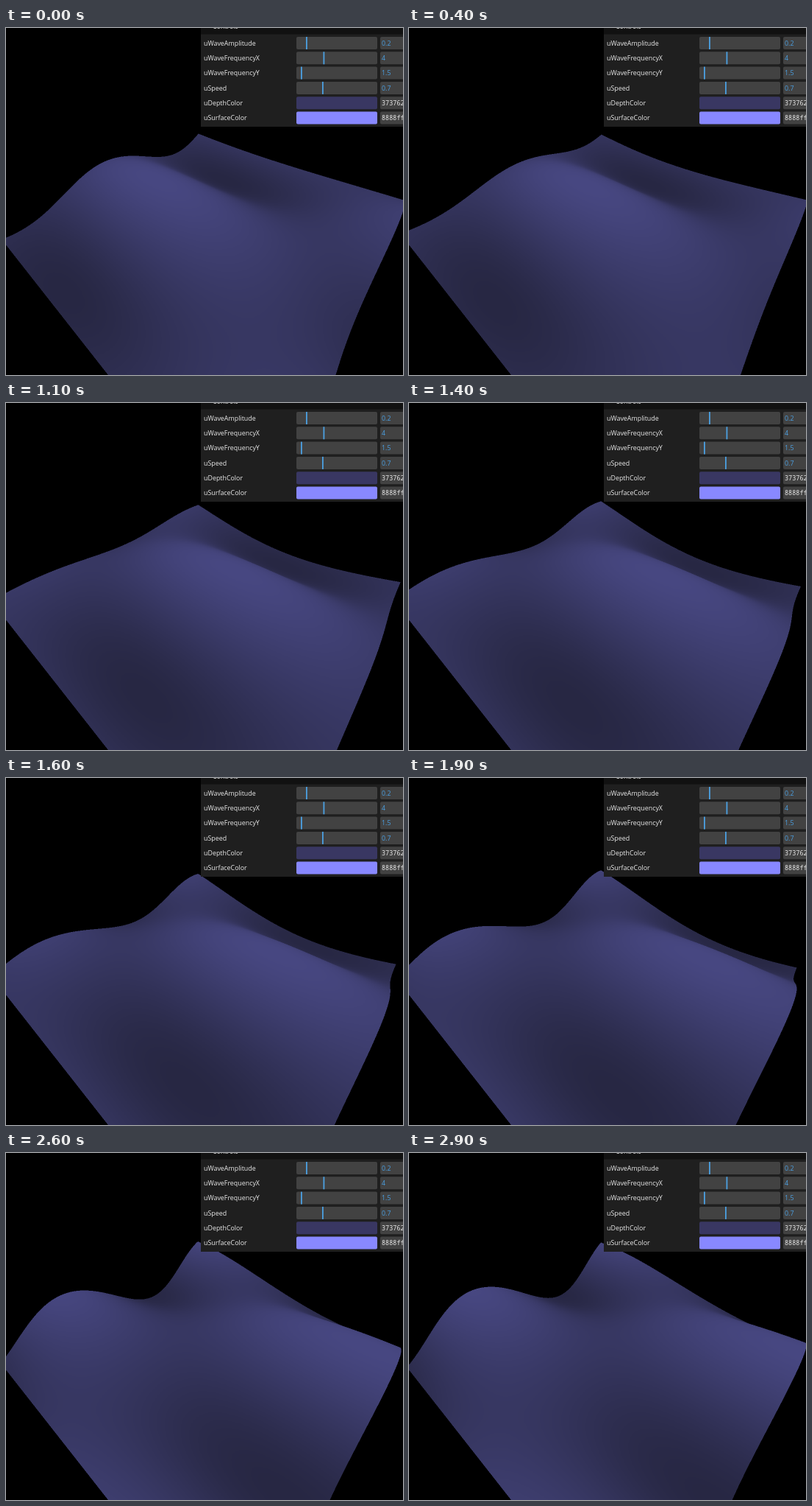
Animation of 540x471 px, one loop 3000 ms. Source, as an HTML page with a canvas:

```html
<!DOCTYPE html>
<html lang="en">
<head>
<meta charset="utf-8">
<title>Wave plane</title>
<style>
  html, body { margin: 0; width: 100%; height: 100%; overflow: hidden; background: #000; }
  canvas { display: block; width: 540px; height: 471px; }
</style>
</head>
<body>
<canvas id="stage" width="540" height="471"></canvas>
<script>
const W = 540, H = 471, LOOP = 3000, STEP = 100;
const ctx = document.getElementById('stage').getContext('2d');

// The mesh is rasterised at double size and scaled down for smooth edges.
const SS = 2, BW = W * SS, BH = H * SS;
const buffer = document.createElement('canvas');
buffer.width = BW;
buffer.height = BH;
const bufferCtx = buffer.getContext('2d');
const image = bufferCtx.createImageData(BW, BH);
const pixels = new Uint32Array(image.data.buffer);

const wave = { amplitude: 0.2, freqX: 4, freqZ: 1.5, speed: 0.7, phase: 1.025 };
const depthColor = [0x37, 0x37, 0x62], surfaceColor = [0x88, 0x88, 0xff];

// Shades for elevations from -amplitude to +amplitude.
const SHADES = 256;
const shades = Uint32Array.from({ length: SHADES }, (_, i) => {
  const mix = (i / (SHADES - 1) * 2 - 1) * wave.amplitude;
  const [r, g, b] = depthColor.map((d, k) => Math.round(d + (surfaceColor[k] - d) * mix));
  return (255 << 24 | b << 16 | g << 8 | r) >>> 0;
});

// Camera looking at the centre of the plane.
const eye = { x: 1, y: 1.1095, z: -0.826 };
const focal = 338, centerX = 278, centerY = 252.6;
const ground = Math.hypot(eye.x, eye.z), range = Math.hypot(ground, eye.y);
const sinPitch = eye.y / range, cosPitch = ground / range;
const forwardX = -eye.x / ground, forwardZ = -eye.z / ground;

const N = 112, ROW = N + 1;
const px = new Float32Array(ROW * ROW), py = new Float32Array(ROW * ROW), shade = new Float32Array(ROW * ROW);

function project(i, x, y, z) {
  const dx = x - eye.x, dy = y - eye.y, dz = z - eye.z;
  const ahead = dx * forwardX + dz * forwardZ;
  const side = dz * forwardX - dx * forwardZ;
  const depth = ahead * cosPitch - dy * sinPitch;
  const up = ahead * sinPitch + dy * cosPitch;
  px[i] = SS * (centerX + focal * side / depth);
  py[i] = SS * (centerY - focal * up / depth);
}

function placeVertices(seconds) {
  const shift = wave.speed * seconds + wave.phase;
  for (let r = 0; r <= N; r++) {
    const x = 2 * r / N - 1, sx = Math.sin(wave.freqX * x + shift);
    for (let c = 0; c <= N; c++) {
      const z = 1 - 2 * c / N, i = r * ROW + c;
      const level = sx * Math.sin(wave.freqZ * z + shift);
      shade[i] = (level + 1) / 2 * (SHADES - 1);
      project(i, x, level * wave.amplitude, z);
    }
  }
}

function fillTriangle(a, b, c) {
  const ax = px[a], ay = py[a], bx = px[b], by = py[b], cx = px[c], cy = py[c];
  const area = (bx - ax) * (cy - ay) - (by - ay) * (cx - ax);
  if (!area) return;
  const x0 = Math.max(0, Math.ceil(Math.min(ax, bx, cx) - 0.5));
  const x1 = Math.min(BW - 1, Math.floor(Math.max(ax, bx, cx) - 0.5));
  const y0 = Math.max(0, Math.ceil(Math.min(ay, by, cy) - 0.5));
  const y1 = Math.min(BH - 1, Math.floor(Math.max(ay, by, cy) - 0.5));
  const ea = shade[a], eb = shade[b] - ea, ec = shade[c] - ea, slack = -1e-4;
  for (let y = y0; y <= y1; y++) {
    const dy = y + 0.5 - ay;
    for (let x = x0; x <= x1; x++) {
      const dx = x + 0.5 - ax;
      const u = (dx * (cy - ay) - dy * (cx - ax)) / area;
      const v = (dy * (bx - ax) - dx * (by - ay)) / area;
      if (u >= slack && v >= slack && u + v <= 1 - slack) {
        pixels[y * BW + x] = shades[Math.round(ea + u * eb + v * ec)];
      }
    }
  }
}

function drawPlane(seconds) {
  pixels.fill(0xff000000);
  placeVertices(seconds);
  // Rows run from the far side towards the camera.
  for (let r = 0; r < N; r++) {
    for (let c = 0; c < N; c++) {
      const i = r * ROW + c;
      fillTriangle(i, i + 1, i + ROW);
      fillTriangle(i + 1, i + ROW + 1, i + ROW);
    }
  }
  bufferCtx.putImageData(image, 0, 0);
  ctx.imageSmoothingEnabled = true;
  ctx.drawImage(buffer, 0, 0, W, H);
}

const UI_FONT = '8.9px "Open Sans", "Noto Sans", sans-serif';
const MONO_FONT = '8.5px "Noto Sans Mono", "DejaVu Sans Mono", monospace';
const BLUE = '#4ba0e2', WHITE = '#ebebeb', WIDGET = '#424242';
const rows = [
  { label: 'uWaveAmplitude', value: '0.2', handle: 408 },
  { label: 'uWaveFrequencyX', value: '4', handle: 431.5 },
  { label: 'uWaveFrequencyY', value: '1.5', handle: 401 },
  { label: 'uSpeed', value: '0.7', handle: 430 },
  { label: 'uDepthColor', value: '373762', swatch: '#393762' },
  { label: 'uSurfaceColor', value: '8888ff', swatch: '#8888ff' }
];

function box(x, y, w, h, color) {
  ctx.fillStyle = color;
  ctx.beginPath();
  ctx.roundRect(x, y, w, h, 2);
  ctx.fill();
}

function text(str, x, y, color, font) {
  ctx.font = font;
  ctx.fillStyle = color;
  ctx.fillText(str, x, y);
}

function drawPanel() {
  ctx.fillStyle = '#1f1f1f';
  ctx.fillRect(265, 0, 275, 134);
  ctx.fillStyle = '#111';
  ctx.fillRect(265, 0, 275, 8.5);
  text('Controls', 281, 1.2, WHITE, UI_FONT);
  rows.forEach((row, i) => {
    const mid = 20.4 + 20.3 * i, top = mid - 8.4;
    text(row.label, 269, mid + 3.2, WHITE, UI_FONT);
    box(395, top, 110, 17, row.swatch || WIDGET);
    box(509, top, 40, 17, WIDGET);
    if (row.swatch) {
      text(row.value, 511, mid + 3.2, WHITE, MONO_FONT);
    } else {
      ctx.fillStyle = BLUE;
      ctx.fillRect(row.handle, top, 1.8, 17);
      text(row.value, 511, mid + 3.4, BLUE, UI_FONT);
    }
  });
}

let shown = -1;
function frame() {
  const step = Math.floor(performance.now() % LOOP / STEP);
  if (step !== shown) {
    shown = step;
    drawPlane(step * STEP / 1000);
    drawPanel();
  }
  requestAnimationFrame(frame);
}
frame();
</script>
</body>
</html>
```
